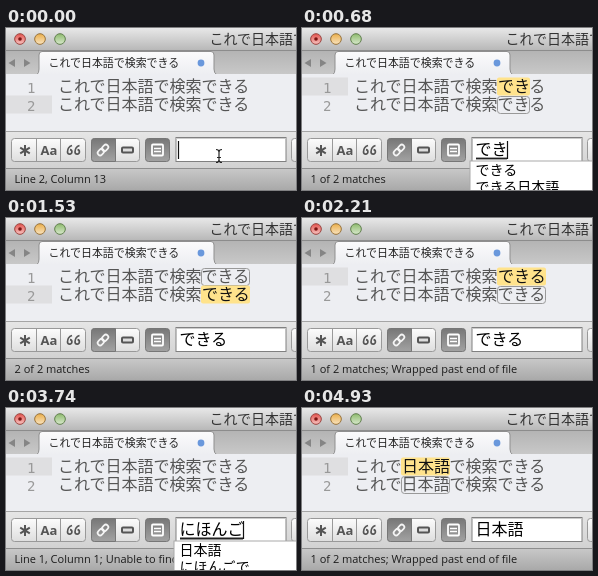
An HTML page for the animation above (5.1 s loop, 290 px wide and 162 px high).

```html
<!DOCTYPE html>
<html lang="ja">
<head>
<meta charset="utf-8">
<title>Japanese text search</title>
<style>
html, body { margin: 0; width: 100%; height: 100%; overflow: hidden; background: #c4c4c4; }
svg { display: block; width: 100vw; height: 100vh; }
text { font-family: "Noto Sans CJK JP", "Noto Sans CJK", sans-serif; white-space: pre; }
.code { font-size: 16px; fill: #555; }
.hit { font-size: 16px; fill: #111; font-weight: 500; }
.num { font: 14px "DejaVu Sans Mono", monospace; fill: #999; }
.status { font: 500 11px "Open Sans", sans-serif; fill: #1c1c1c; }
.field { font-size: 16px; font-weight: 500; fill: #000; }
.item { font-size: 14px; font-weight: 500; fill: #000; }
.latin { font: 700 13px "Open Sans", sans-serif; fill: #555; }
</style>
</head>
<body>
<svg viewBox="0 0 290 162">
  <defs>
    <linearGradient id="bar" x2="0" y2="1"><stop stop-color="#e8e8e8"/><stop offset="1" stop-color="#b8b8b8"/></linearGradient>
    <linearGradient id="tabs" x2="0" y2="1"><stop stop-color="#b3b3b3"/><stop offset="1" stop-color="#c8c8c8"/></linearGradient>
    <linearGradient id="tab" x2="0" y2="1"><stop stop-color="#fbfbfc"/><stop offset="1" stop-color="#edeef2"/></linearGradient>
    <linearGradient id="panel" x2="0" y2="1"><stop stop-color="#e6e6e6"/><stop offset="1" stop-color="#d2d2d2"/></linearGradient>
    <linearGradient id="foot" x2="0" y2="1"><stop stop-color="#c9c9c9"/><stop offset="1" stop-color="#a9a9a9"/></linearGradient>
    <linearGradient id="key" x2="0" y2="1"><stop stop-color="#fcfcfc"/><stop offset="1" stop-color="#dedede"/></linearGradient>
    <linearGradient id="down" x2="0" y2="1"><stop stop-color="#777"/><stop offset="1" stop-color="#a2a2a2"/></linearGradient>
    <linearGradient id="gloss" x2="0" y2="1"><stop stop-color="#fff" stop-opacity=".1"/><stop offset="1" stop-color="#fff" stop-opacity=".65"/></linearGradient>
  </defs>

  <!-- title bar -->
  <rect width="290" height="22" fill="url(#bar)"/>
  <g stroke-width="1">
    <circle cx="14" cy="11" r="5.300" fill="#e2463f" stroke="#98433e"/>
    <circle cx="34" cy="11" r="5.300" fill="#e9a83b" stroke="#95703a"/>
    <circle cx="54" cy="11" r="5.300" fill="#85b662" stroke="#5f7d4d"/>
  </g>
  <g fill="url(#gloss)">
    <circle cx="14" cy="11" r="4.800"/><circle cx="34" cy="11" r="4.800"/><circle cx="54" cy="11" r="4.800"/>
  </g>
  <circle cx="14" cy="11" r="1.800" fill="#7c1512"/>
  <text x="203.500" y="16" font-size="14" fill="#333">これで日本語で検索できる</text>

  <!-- tabs -->
  <rect y="22" width="290" height="24" fill="url(#tabs)"/>
  <path d="M0 22.500H290" stroke="#8c8c8c"/>
  <path d="M9 31V39L2.500 35ZM18 31V39L24.500 35Z" fill="#858585"/>
  <path d="M31 46.500Q33 45 33 41V27Q33 23.500 36 23.500H205Q208 23.500 208 27V41Q208 45 210.500 46.500" fill="url(#tab)" stroke="#8f8f8f"/>
  <text x="42.500" y="38.500" font-size="10.950" font-weight="500" fill="#222">これで日本語で検索できる</text>
  <circle cx="195" cy="35" r="3.400" fill="#6a98dc"/>

  <!-- editor -->
  <rect y="46" width="290" height="57" fill="#edeef2"/>
  <rect id="gutter" width="46" height="18" fill="#dfdfe1"/>
  <text class="num" x="21" y="64.500">1</text>
  <text class="num" x="21" y="82.500">2</text>
  <text class="code" x="52" y="64.300">これで日本語で検索できる</text>
  <text class="code" x="52" y="82.300">これで日本語で検索できる</text>
  <g id="marks"></g>

  <!-- find panel -->
  <rect y="103" width="290" height="37" fill="url(#panel)"/>
  <path d="M0 103.500H290" stroke="#a5a5a5"/>
  <g stroke="#999">
    <rect x="5.500" y="110.500" width="74" height="23" rx="3" fill="url(#key)"/>
    <path d="M30.500 111V133M54.500 111V133"/>
    <rect x="85.500" y="110.500" width="48" height="23" rx="3" fill="url(#key)"/>
    <path d="M109.500 110.500V133.500H88.500Q85.500 133.500 85.500 130.500V113.500Q85.500 110.500 88.500 110.500Z" fill="url(#down)" stroke="#777"/>
    <rect x="139.500" y="110.500" width="24" height="23" rx="3" fill="url(#down)" stroke="#777"/>
    <rect x="285.500" y="110.500" width="20" height="23" rx="3" fill="url(#key)"/>
  </g>
  <path d="M19 117V128M14.200 119.700L23.800 125.300M23.800 119.700L14.200 125.300" stroke="#555" stroke-width="2"/>
  <text class="latin" x="34.500" y="127">Aa</text>
  <path d="M66 117.500Q61.500 119 61.500 124A2.200 2.200 0 1 0 64 121.700M73.500 117.500Q69 119 69 124A2.200 2.200 0 1 0 71.500 121.700" fill="none" stroke="#555" stroke-width="1.700"/>
  <g fill="none" stroke="#f4f4f4" stroke-width="1.700" transform="rotate(-45 97 122)">
    <rect x="90.500" y="119.500" width="7" height="5" rx="2.500"/>
    <rect x="96.500" y="119.500" width="7" height="5" rx="2.500"/>
  </g>
  <rect x="116" y="119.500" width="11" height="5" rx="1" fill="#ddd" stroke="#555" stroke-width="2"/>
  <rect x="146" y="116.500" width="11" height="11" rx="1" fill="none" stroke="#fff" stroke-width="1.800"/>
  <path d="M148 120.500H155M148 123.500H155" stroke="#fff" stroke-width="1.600"/>
  <rect x="170" y="109.500" width="110" height="24" fill="#fff" stroke="#808080"/>
  <path d="M170.500 110.500H279.500" stroke="#ccc"/>
  <text id="field" class="field" x="173.500" y="127"></text>
  <path id="underline" stroke="#222" stroke-width="1.800"/>
  <path id="caret" stroke="#111" stroke-width="1.200"/>
  <path id="pointer" d="M210 121.500Q213 121.500 213 124V132Q213 134.500 210 134.500M216 121.500Q213 121.500 213 124M213 132Q213 134.500 216 134.500M211 129.500H215" fill="none" stroke="#222" stroke-width="1.200"/>

  <!-- status bar -->
  <rect y="140" width="290" height="22" fill="url(#foot)"/>
  <path d="M0 140.500H290" stroke="#8e8e8e"/>
  <text id="status" class="status" x="8.500" y="155"></text>

  <!-- candidates -->
  <g id="popup">
    <rect x="168" y="133" width="130" height="40" fill="#fff" stroke="#aaa"/>
    <text id="first" class="item" x="173.500" y="146.800"></text>
    <text id="second" class="item" x="173.500" y="164.300"></text>
  </g>
</svg>
<script>
const LINE = "これで日本語で検索できる";
const STEP = 170, LOOP = 5100;
const $ = id => document.getElementById(id);
const show = (id, on) => $(id).setAttribute("visibility", on ? "visible" : "hidden");

const WRAP = "; Wrapped past end of file";
const missing = (place, query) => `${place}; Unable to find "${query}"`;
const lost2 = q => missing("Line 2, Column 13", q);
const lost1 = q => missing("Line 1, Column 1", q);
const dekiru = ["できる", "できる日本語"];
const nihongo = ["日本語", "にほんごで"];

// at: step; row: current line; hit: line of the selected match (0 = no match)
const states = [
  { at: 0, row: 2, status: "Line 2, Column 13", caret: true, pointer: true },
  { at: 1, row: 2, text: "ｄ", status: lost2("ｄ"), typing: true },
  { at: 2, row: 1, text: "で", hit: 1, status: "1 of 6 matches", typing: true, list: dekiru },
  { at: 3, row: 2, text: "でｋ", status: lost2("でｋ"), typing: true, list: dekiru },
  { at: 4, row: 1, text: "でき", hit: 1, status: "1 of 2 matches", typing: true, list: dekiru },
  { at: 5, row: 2, text: "できｒ", status: lost2("できｒ"), typing: true, list: dekiru },
  { at: 6, row: 1, text: "できる", hit: 1, status: "1 of 2 matches", typing: true, list: dekiru },
  { at: 7, row: 1, text: "できる", hit: 1, status: "1 of 2 matches", caret: true },
  { at: 9, row: 2, text: "できる", hit: 2, status: "2 of 2 matches" },
  { at: 12, row: 1, text: "できる", hit: 1, status: "1 of 2 matches" + WRAP },
  { at: 17, row: 1, status: "3 characters selected" + WRAP, caret: true },
  { at: 19, row: 1, text: "に", status: lost1("に"), typing: true, list: nihongo },
  { at: 20, row: 1, text: "にほ", status: lost1("にほ"), typing: true, list: nihongo },
  { at: 21, row: 1, text: "にほん", status: lost1("にほん"), typing: true, list: nihongo },
  { at: 22, row: 1, text: "にほんご", status: lost1("にほんご"), typing: true, list: nihongo },
  { at: 24, row: 1, text: "日本語", hit: 1, status: "1 of 2 matches", typing: true },
  { at: 25, row: 1, text: "日本語", hit: 1, status: "1 of 2 matches", caret: true },
  { at: 26, row: 2, text: "日本語", hit: 2, status: "2 of 2 matches" },
  { at: 28, row: 1, text: "日本語", hit: 1, status: "1 of 2 matches" + WRAP, caret: true },
  { at: 29, row: 1, text: "日本語", hit: 1, status: "1 of 2 matches" + WRAP }
];

function markup(query, hit) {
  if (!hit) return "";
  let svg = "";
  for (const row of [1, 2]) {
    let selected = row === hit;
    for (let i = LINE.indexOf(query); i >= 0; i = LINE.indexOf(query, i + 1)) {
      const x = 52 + i * 16, y = 31.5 + row * 18, w = query.length * 16;
      svg += selected
        ? `<rect x="${x - 1}" y="${y}" width="${w + 1}" height="18" rx="2" fill="#ffe38c"/>
           <text class="hit" x="${x}" y="${y + 14.8}">${query}</text>`
        : `<rect x="${x - .5}" y="${y + 1}" width="${w}" height="17" rx="3" fill="none" stroke="#999"/>`;
      selected = false;
    }
  }
  return svg;
}

function render(s) {
  const text = s.text || "", end = 173 + text.length * 16;
  $("field").textContent = text;
  $("status").textContent = s.status;
  $("gutter").setAttribute("y", 31.5 + s.row * 18);
  $("marks").innerHTML = markup(text, s.hit);
  $("underline").setAttribute("d", `M174 130.500H${end}`);
  $("caret").setAttribute("d", `M${text ? end + .5 : 172.5} 113V131`);
  show("underline", s.typing);
  show("caret", s.caret || s.typing);
  show("pointer", s.pointer);
  show("popup", s.list);
  [$("first").textContent, $("second").textContent] = s.list || ["", ""];
}

let current;
function tick() {
  const step = Math.floor(performance.now() % LOOP / STEP);
  const state = states.findLast(s => s.at <= step);
  if (state !== current) render(current = state);
  requestAnimationFrame(tick);
}
tick();
</script>
</body>
</html>
```
